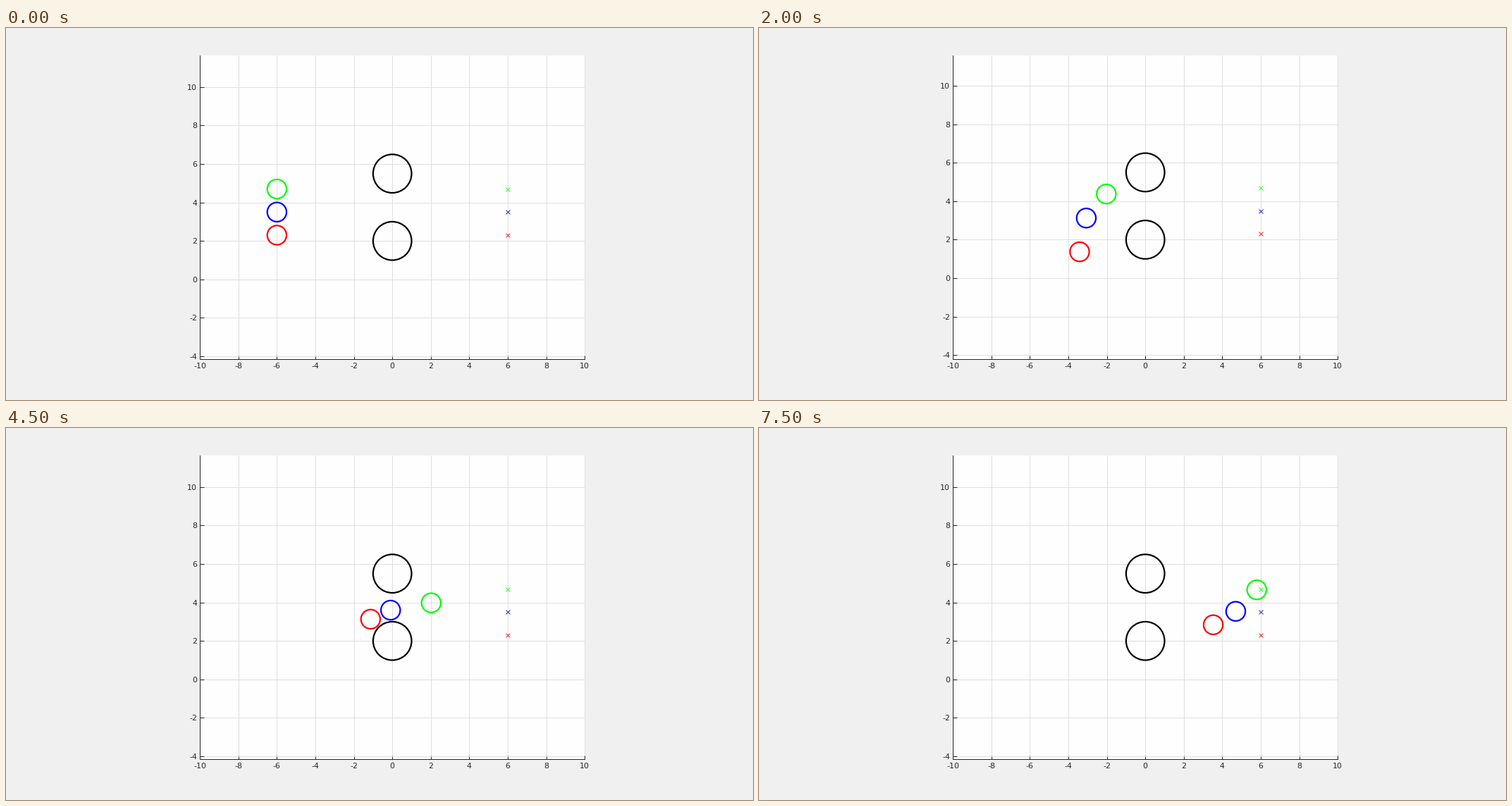
These frames come from a looping animation (1060 px wide and 528 px high, 8000 ms). A matplotlib script:

```python
import math

import matplotlib.pyplot as plt
import numpy as np
from matplotlib.animation import FuncAnimation
from matplotlib.patches import Circle

W, H, DPI = 1060, 528, 100
PX = 72 / DPI                      # one pixel in points
LEFT, TOP, RIGHT, BOTTOM = 275.2, 38.95, 821.2, 469.95
UNIT = (RIGHT - LEFT) / 20         # pixels per data unit
SPAN = (BOTTOM - TOP) / UNIT
GRID, INK = "#dfdfdf", "#262626"
STEPS = 16
R_AGENT, R_WALL = 0.5, 1.0
WALLS = [(0, 5.5), (0, 2)]
START_X, GOAL_X = -6, 6
TOP_SPEED, BRAKE = 1.0, 0.6        # per step; share of the distance left

# Per agent: lane height, then (step, x, y) turns taken to pass the gap
AGENTS = {
    "#ff0000": (2.3, [(3, -4.38, 1.61), (5, -2.45, 1.13), (6, -2.3, 1.11),
                      (7, -2.56, 1.82), (9, -1.13, 3.13), (10, -1.14, 4.11),
                      (12, 0.6, 3.48)]),
    "#0000ff": (3.5, [(3, -4, 3.43), (5, -2.14, 2.82), (7, -1.32, 2.9),
                      (9, -0.09, 3.6), (10, 0.88, 3.63), (11, 0.88, 3.63),
                      (12, 1.7, 3.63)]),
    "#00ff00": (4.7, [(3, -3, 4.6), (5, -1.06, 4.15), (7, 0.57, 3.8),
                      (8, 1.06, 3.85), (10, 2.98, 4.11), (11, 2.98, 4.11),
                      (12, 3.72, 4.24)]),
}


def trajectory(lane, turns):
    """Follow the turns, then head straight for the goal and brake."""
    t, x, y = zip((0, START_X, lane), *turns)
    steps = np.arange(t[-1] + 1)
    path = list(zip(np.interp(steps, t, x), np.interp(steps, t, y)))
    while len(path) < STEPS:
        px, py = path[-1]
        dx, dy = GOAL_X - px, lane - py
        share = min(TOP_SPEED / math.hypot(dx, dy), BRAKE)
        path.append((px + share * dx, py + share * dy))
    return path


def style_axes(ax):
    ax.set_facecolor("#fefefe")
    ax.set_axisbelow(True)
    ax.set_xlim(-10, 10)
    ax.set_xticks(range(-10, 11, 2))
    ax.set_yticks(range(-4, 11, 2))
    ax.grid(color=GRID, linewidth=PX)
    ax.tick_params(direction="in", length=5.5 * PX, width=PX, color=INK,
                   labelcolor=INK, labelsize=11 * PX)
    ax.tick_params(axis="x", pad=4.6 * PX)
    ax.tick_params(axis="y", pad=4 * PX)
    for side in ("left", "bottom"):
        ax.spines[side].set(color=INK, linewidth=PX)
    ax.spines["top"].set_visible(False)
    ax.spines["right"].set(color=GRID, linewidth=PX, zorder=0.4)


def ring(center, radius, color):
    return ax.add_patch(Circle(center, radius, fill=False, edgecolor=color,
                               linewidth=2.2 * PX, zorder=3))


plt.rcParams.update({"font.family": "DejaVu Sans", "axes.unicode_minus": False})
fig = plt.figure(figsize=(W / DPI, H / DPI), dpi=DPI, facecolor="#f0f0f0")
ax = fig.add_axes([LEFT / W, 1 - BOTTOM / H, (RIGHT - LEFT) / W, (BOTTOM - TOP) / H])
style_axes(ax)

for wall in WALLS:
    ring(wall, R_WALL, "black")
paths, rings = {}, {}
for color, (lane, turns) in AGENTS.items():
    paths[color] = trajectory(lane, turns)
    rings[color] = ring((START_X, lane), R_AGENT, color)
    ax.plot(GOAL_X, lane, "x", color=color, markersize=6 * PX,
            markeredgewidth=0.85 * PX)


def update(step):
    for color, agent in rings.items():
        agent.center = paths[color][step]
    # The view stays centred on the vertical extent of all circles
    low = min([a.center[1] - R_AGENT for a in rings.values()]
              + [y - R_WALL for _, y in WALLS])
    high = max(y + R_WALL for _, y in WALLS)
    mid = (low + high) / 2
    ax.set_ylim(mid - SPAN / 2, mid + SPAN / 2)
    return list(rings.values())


anim = FuncAnimation(fig, update, frames=STEPS, interval=500,
                     repeat=True, repeat_delay=0, blit=False)
plt.show()
```
